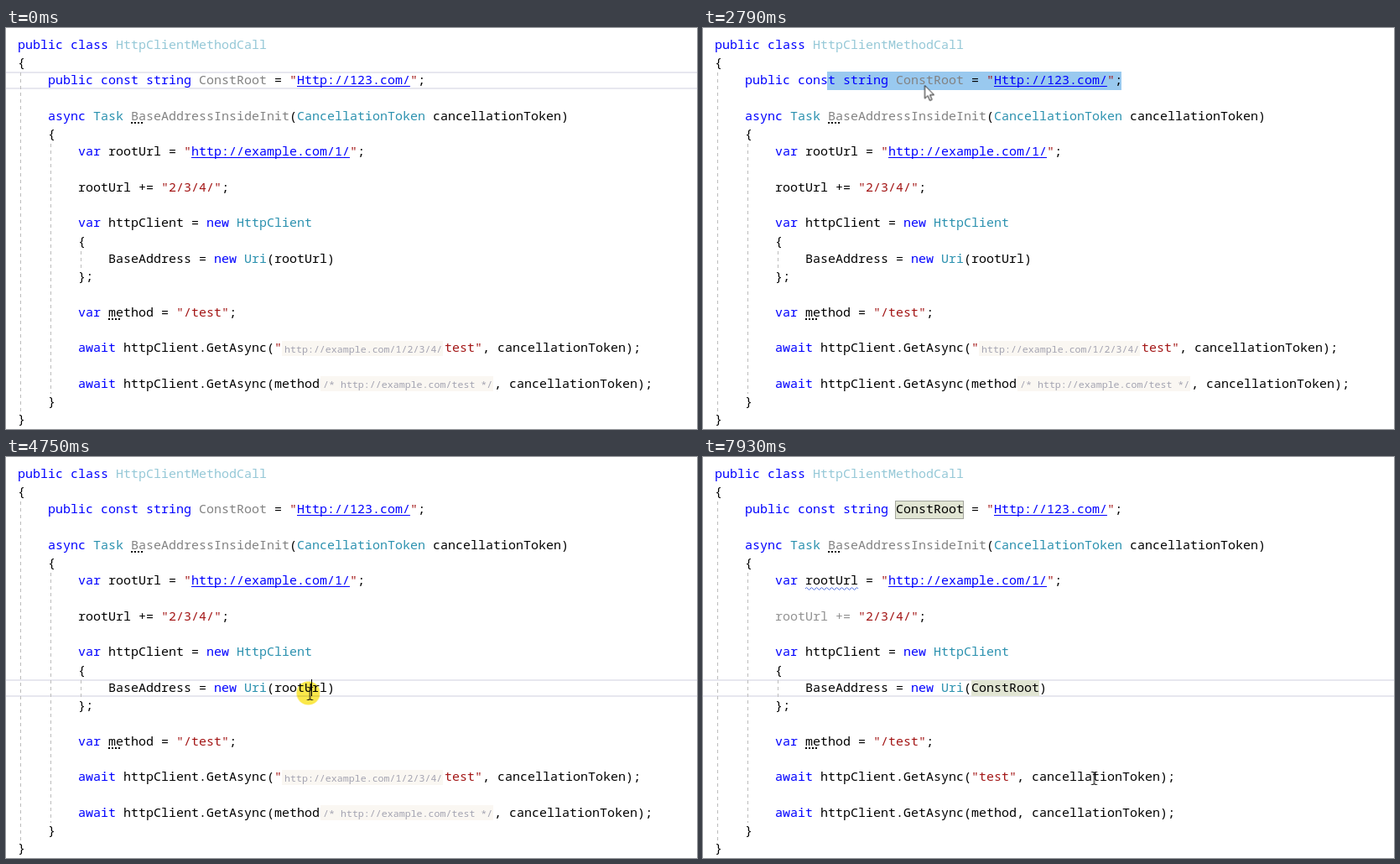
An HTML page for the animation above (8000 ms loop, 824 px wide and 478 px high).

```html
<!DOCTYPE html>
<html lang="en">
<head>
<meta charset="utf-8">
<title>Code editor</title>
<style>
html, body { margin: 0; width: 100%; height: 100%; overflow: hidden; background: #fff; }
svg { display: block; width: 824px; height: 478px; }
text { font: 15px "Noto Sans Mono", monospace; white-space: pre; fill: #000; }
rect, .guide { shape-rendering: crispEdges; }

/* syntax colours */
.k { fill: #0000ff; }
.t { fill: #2b91af; }
.s { fill: #a31515; }
.u { fill: #828282; }
.faded { fill: #95c8d7; }
.note { font-size: 11.63px; fill: #a3a3b1; }
.noteBox { fill: #faf7f2; }
.link { fill: #0000ff; }
.guide { stroke: #bcbcbc; stroke-dasharray: 4 4; }
.line { fill: #e7e7ef; }
.sel { fill: #99c9ef; }
.ref { fill: #e1e5d3; }

/* switches, all on the same 8 s clock */
.line2, .line12, .drag, .name, .pick, .caret, .caretIn, .press, .beam, .arrow,
.before, .after, .used, .unused, .hint, .plain, .refs {
  animation: 8s step-end infinite;
}
.line2 { animation-name: line2; }
.line12 { animation-name: line12; }
.drag { animation-name: drag; }
.name { animation-name: name; }
.pick { animation-name: pick; }
.caret { animation-name: caret; }
.caretIn { animation-name: caretIn; }
.press { animation-name: press; mix-blend-mode: multiply; }
.beam { animation-name: beam; }
.arrow { animation-name: arrow; }
.before { animation-name: before; }
.after { animation-name: after; }
.unused { animation-name: unused; }
.used { animation-name: used; }
.hint { animation-name: hint; }
.plain, .refs { animation-name: plain; }
.mouse { animation: mouse 8s infinite; }

@keyframes line2 { 0%, 36.625% { opacity: 1; } 12.625%, 38.375%, 100% { opacity: 0; } }
@keyframes line12 { 0%, 61.875% { opacity: 0; } 59.375%, 64.375%, 100% { opacity: 1; } }
@keyframes name { 0%, 59.375%, 100% { opacity: 0; } 38.375% { opacity: 1; } }
@keyframes pick { 0%, 64.375%, 100% { opacity: 0; } 61.875% { opacity: 1; } }
@keyframes caretIn { 0%, 61.875%, 100% { opacity: 0; } 59.375% { opacity: 1; } }
@keyframes caret {
  0%, 74.5%, 85.625%, 98.25%, 100% { opacity: 0; }
  64.375%, 79%, 91.5% { opacity: 1; }
}
@keyframes press {
  0%, 29%, 39.25%, 61.875%, 100% { opacity: 0; }
  12.625%, 36.625%, 59.375% { opacity: 1; }
}
@keyframes beam { 0%, 32.25% { opacity: 0; } 5%, 50%, 100% { opacity: 1; } }
@keyframes arrow { 0%, 50%, 100% { opacity: 0; } 32.25% { opacity: 1; } }
@keyframes before { 0% { opacity: 1; } 64.375%, 100% { opacity: 0; } }
@keyframes after { 0% { opacity: 0; } 64.375%, 100% { opacity: 1; } }
@keyframes unused { 0% { opacity: 1; } 68.5%, 100% { opacity: 0; } }
@keyframes used { 0% { opacity: 0; } 68.5%, 100% { opacity: 1; } }
@keyframes hint { 0% { opacity: 1; } 89%, 100% { opacity: 0; } }
@keyframes plain { 0% { opacity: 0; } 89%, 100% { opacity: 1; } }

/* selection grows leftwards from the end of the row */
@keyframes drag {
  0% { x: 499px; width: 0; }
  12.625% { x: 499px; width: 0; animation-timing-function: steps(5); }
  17.75% { x: 409px; width: 90px; }
  18.625% { x: 328px; width: 171px; }
  19.5% { x: 14px; width: 485px; }
  27.25% { x: 86px; width: 413px; }
  28.125% { x: 148px; width: 351px; }
  36.625%, 100% { x: 499px; width: 0; }
}
@keyframes mouse {
  0% { transform: translate(552px, 211px); animation-timing-function: step-end; }
  5% { transform: translate(552px, 211px); animation-timing-function: steps(2); }
  6.75% { transform: translate(500px, 133px); animation-timing-function: step-end; }
  9.125% { transform: translate(500px, 133px); animation-timing-function: steps(4); }
  12.625% { transform: translate(500px, 62px); animation-timing-function: steps(5); }
  17.75% { transform: translate(414.5px, 58px); animation-timing-function: steps(2); }
  19.5% { transform: translate(238px, 52px); animation-timing-function: steps(5); }
  23.875% { transform: translate(38px, 46px); animation-timing-function: step-end; }
  25.5% { transform: translate(38px, 46px); animation-timing-function: steps(4); }
  29% { transform: translate(150px, 59px); animation-timing-function: step-end; }
  31.375% { transform: translate(150px, 59px); animation-timing-function: steps(4); }
  34.875% { transform: translate(264.5px, 68.5px); animation-timing-function: step-end; }
  47.5% { transform: translate(264.5px, 68.5px); animation-timing-function: steps(9); }
  56.125% { transform: translate(362.5px, 282px); animation-timing-function: step-end; }
  73.625% { transform: translate(362.5px, 282px); animation-timing-function: steps(6); }
  78.75% { transform: translate(470.5px, 325px); animation-timing-function: steps(6); }
  84% { transform: translate(420.5px, 339px); animation-timing-function: step-end; }
  93.125% { transform: translate(420.5px, 339px); animation-timing-function: steps(6); }
  99.125%, 100% { transform: translate(466.5px, 383px); animation-timing-function: step-end; }
}
</style>
</head>
<body>
<svg viewBox="0 0 824 478">
  <defs>
    <pattern id="wave" x="122" y="155" width="6" height="4" patternUnits="userSpaceOnUse">
      <path d="M0 2Q1.5 -1 3 2T6 2" fill="none" stroke="#4a6be0"/>
    </pattern>
    <g id="dots">
      <rect width="2" height="2"/><rect x="4" width="2" height="2"/>
      <rect x="8" width="2" height="2"/><rect x="12" width="2" height="2"/>
    </g>
    <g id="edges"><rect width="824" height="2"/><rect y="19" width="824" height="2"/></g>
  </defs>

  <!-- row marks and selections -->
  <use href="#edges" y="52" class="line line2"/>
  <use href="#edges" y="265" class="line line12"/>
  <path class="guide" d="M17.5 53V457M53.5 138V436M89.5 266V287"/>
  <rect class="sel drag" x="499" y="52" width="0" height="22"/>
  <g class="name">
    <rect x="229" y="52" width="83" height="21" fill="#86b7d5"/>
    <path d="M229.5 72V52.5H311" fill="none" stroke="#7299ad"/>
    <rect x="229" y="71" width="83" height="2" fill="#1018e0"/>
    <rect x="311" y="52" width="1" height="21"/>
  </g>
  <rect class="sel pick" x="320" y="265" width="63" height="21"/>
  <g class="refs">
    <rect class="ref" x="229.5" y="52.5" width="81" height="21" stroke="#a3a59c"/>
    <rect class="ref" x="320" y="266" width="81" height="19"/>
  </g>
  <g class="hint">
    <rect class="noteBox" x="329" y="373" width="192" height="18"/>
    <rect class="noteBox" x="375" y="415" width="206" height="18"/>
  </g>

  <!-- code -->
  <text x="14" y="25"><tspan class="k">public class</tspan> <tspan class="faded">HttpClientMethodCall</tspan></text>
  <text x="14" y="46">{</text>
  <text x="50" y="67"><tspan class="k">public const string</tspan></text>
  <text x="230" y="67" class="unused"><tspan class="u">ConstRoot</tspan></text>
  <text x="230" y="67" class="used">ConstRoot</text>
  <text x="320" y="67">= <tspan class="s">"</tspan><tspan class="k">Http://123.com/</tspan><tspan class="s">"</tspan>;</text>
  <rect class="link" x="347" y="69" width="135" height="1"/>

  <text x="50" y="110"><tspan class="k">async</tspan> <tspan class="t">Task</tspan> <tspan class="u">BaseAddressInsideInit</tspan>(<tspan class="t">CancellationToken</tspan> cancellationToken)</text>
  <use href="#dots" x="149" y="112"/>
  <text x="50" y="131">{</text>
  <text x="86" y="152"><tspan class="k">var</tspan> rootUrl = <tspan class="s">"</tspan><tspan class="k">http://example.com/1/</tspan><tspan class="s">"</tspan>;</text>
  <rect class="link" x="221" y="154" width="189" height="1"/>
  <rect class="used" x="122" y="155" width="63" height="4" fill="url(#wave)"/>

  <text x="86" y="195" class="unused">rootUrl +=</text>
  <text x="86" y="195" class="used"><tspan fill="#929292">rootUrl +=</tspan></text>
  <text x="185" y="195"><tspan class="s">"2/3/4/"</tspan>;</text>

  <text x="86" y="237"><tspan class="k">var</tspan> httpClient = <tspan class="k">new</tspan> <tspan class="t">HttpClient</tspan></text>
  <text x="86" y="259">{</text>
  <text x="122" y="280">BaseAddress = <tspan class="k">new</tspan> <tspan class="t">Uri</tspan>(</text>
  <text x="320" y="280" class="before">rootUrl)</text>
  <text x="320" y="280" class="after">ConstRoot)</text>
  <text x="86" y="301">};</text>

  <text x="86" y="344"><tspan class="k">var</tspan> method = <tspan class="s">"/test"</tspan>;</text>
  <use href="#dots" x="122" y="346"/>

  <text x="86" y="386"><tspan class="k">await</tspan> httpClient.GetAsync(<tspan class="s">"</tspan></text>
  <text x="86" y="429"><tspan class="k">await</tspan> httpClient.GetAsync(method</text>
  <g class="hint">
    <text x="332" y="387" class="note">http://example.com/1/2/3/4/</text>
    <text x="523" y="386"><tspan class="s">test"</tspan>, cancellationToken);</text>
    <text x="378" y="429" class="note">/* http://example.com/test */</text>
    <text x="582" y="429">, cancellationToken);</text>
  </g>
  <g class="plain">
    <text x="329" y="386"><tspan class="s">test"</tspan>, cancellationToken);</text>
    <text x="374" y="429">, cancellationToken);</text>
  </g>
  <text x="50" y="450">}</text>
  <text x="14" y="471">}</text>

  <!-- carets and mouse -->
  <rect class="caretIn" x="364" y="265" width="1" height="20"/>
  <rect class="caret" x="401" y="265" width="1" height="20"/>
  <g class="mouse">
    <circle class="press" cx="-2" cy="-.5" r="14" fill="#fbe84a"/>
    <path class="beam" d="M-3.5 -7.5H-1.5L0 -6.5 1.5 -7.5H3.5M0 -6.5V6.5M-3.5 7.5H-1.5L0 6.5 1.5 7.5H3.5" fill="none" stroke="#111" stroke-width="1.2"/>
    <path class="arrow" d="M0 0V15.5L3.6 12.2 6 18 8.6 16.9 6.2 11.2H11Z" fill="#fff" stroke="#111"/>
  </g>
</svg>
</body>
</html>
```
